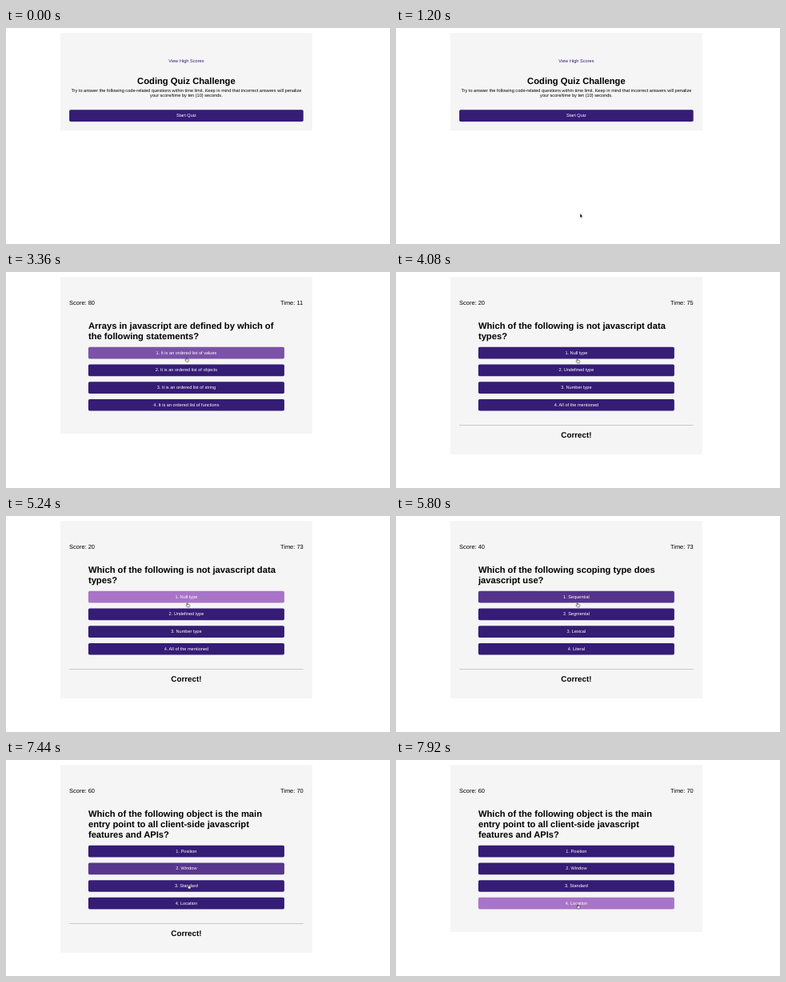
An HTML page that plays this animation: 480x270 px, repeating every 8 s.

```html
<!DOCTYPE html>
<html lang="en">
<head>
<meta charset="utf-8">
<title>Coding Quiz Challenge</title>
<style>
  :root { --dark: #351c75; --light: #a874c8; --half: #6d469b; }
  html, body { margin: 0; width: 100%; height: 100%; overflow: hidden; background: #fff; }

  /* Page laid out at full size, shown at 35% */
  .page {
    position: absolute; left: 0; top: 0; width: 1371px; height: 771px;
    transform: scale(.35); transform-origin: 0 0;
    font: 16px/18.4px "Liberation Sans", Arial, sans-serif; color: #000;
    text-rendering: geometricPrecision; white-space: nowrap;
  }
  .page * { box-sizing: border-box; }
  .panel, .intro, .quiz, .question, .feedback { position: absolute; left: 194px; top: 0; width: 900px; }
  .panel { top: 18px; height: 348px; background: #f5f5f5; }
  .panel, .intro, .quiz, .question, .feedback, .strip { animation: 8s step-end infinite; }
  .quiz, .question, .feedback { visibility: hidden; }

  .intro { text-align: center; }
  .intro > * { position: absolute; left: 0; width: 100%; margin: 0; }
  .link { top: 110px; color: var(--dark); }
  h1 { top: 170px; font-size: 32px; line-height: 36.8px; }
  .intro p { top: 216px; }

  .btn {
    height: 42px; margin: 0 0 20px; line-height: 42px; text-align: center;
    color: #fff; background: var(--dark); border-radius: 5px;
    animation: 8s ease infinite;
  }
  .intro .btn { left: 32px; top: 292px; width: 836px; }

  .stat { position: absolute; top: 98px; height: 24px; font-size: 21.3px; line-height: 24px; display: flex; overflow: hidden; }
  .score { left: 32px; }
  .time { right: 32px; }
  .stat b { font-weight: normal; white-space: pre; }
  .strip span { display: block; height: 24px; }

  .question { left: 294px; top: 174.4px; width: 700px; }
  h2 { margin: 0 0 20px; font-size: 32px; line-height: 36.8px; }

  .feedback { top: 546px; text-align: center; }
  .feedback i { display: block; height: 1px; margin: 0 32px 20px; background: #777; }
  .feedback strong { font-size: 28px; line-height: 32.2px; }

  /* Screens */
  .panel { animation-name: panel; }
  .intro { animation-name: intro; }
  .quiz { animation-name: quiz; }
  .q1 { animation-name: q1; }
  .q2 { animation-name: q2; }
  .q3 { animation-name: q3; }
  .q4 { animation-name: q4; }
  .feedback { animation-name: feedback; }
  @keyframes panel {
    0% { height: 348px } 32.9% { height: 559px } 50.9% { height: 633px }
    74.4% { height: 559px } 85.9% { height: 670px } 94.4%, 100% { height: 596px }
  }
  @keyframes intro { 0% { visibility: visible } 32.9%, 100% { visibility: hidden } }
  @keyframes quiz { 0% { visibility: hidden } 32.9%, 100% { visibility: visible } }
  @keyframes q1 { 0% { visibility: hidden } 32.9% { visibility: visible } 50.9%, 100% { visibility: hidden } }
  @keyframes q2 { 0% { visibility: hidden } 50.9% { visibility: visible } 71.9%, 100% { visibility: hidden } }
  @keyframes q3 { 0% { visibility: hidden } 71.9% { visibility: visible } 85.9%, 100% { visibility: hidden } }
  @keyframes q4 { 0% { visibility: hidden } 85.9%, 100% { visibility: visible } }
  @keyframes feedback {
    0% { visibility: hidden; top: 546px } 50.9% { visibility: visible; top: 546px }
    74.4% { visibility: hidden; top: 546px } 85.9% { visibility: visible; top: 582.8px }
    94.4%, 100% { visibility: hidden; top: 582.8px }
  }

  /* Counters */
  .score .strip { animation-name: score; }
  .time .strip { animation-name: time; }
  @keyframes score {
    0% { transform: translateY(0) } 43.9% { transform: translateY(-24px) }
    50.9% { transform: translateY(-48px) } 71.9% { transform: translateY(-72px) }
    85.9%, 100% { transform: translateY(-96px) }
  }
  @keyframes time {
    0% { transform: translateY(0) } 43.9% { transform: translateY(-24px) }
    56.9% { transform: translateY(-48px) } 65.3% { transform: translateY(-72px) }
    77.4% { transform: translateY(-96px) } 81.8% { transform: translateY(-120px) }
    92%, 100% { transform: translateY(-144px) }
  }

  /* Hover fades */
  .h-start { animation-name: h-start; }
  .h-1a { animation-name: h-1a; }
  .h-2a { animation-name: h-2a; }
  .h-3a { animation-name: h-3a; }
  .h-3b { animation-name: h-3b; }
  .h-3c { animation-name: h-3c; }
  .h-4b { animation-name: h-4b; }
  .h-4c { animation-name: h-4c; }
  .h-4d { animation-name: h-4d; }
  @keyframes h-start { 0%, 23.19% { background: var(--dark) } 26.94%, 100% { background: var(--light) } }
  @keyframes h-1a { 0%, 40.69% { background: var(--dark) } 44.44%, 100% { background: var(--light) } }
  @keyframes h-2a { 0%, 50.9% { background: var(--dark) } 54.2%, 100% { background: var(--light) } }
  @keyframes h-3a { 0%, 71.9% { background: var(--dark) } 75.2%, 78% { background: var(--light) } 81.75%, 100% { background: var(--dark) } }
  @keyframes h-3b { 0%, 78.8% { background: var(--dark) } 80% { background: var(--half) } 81.5%, 100% { background: var(--dark) } }
  @keyframes h-3c { 0%, 80.69% { background: var(--dark) } 84.44%, 100% { background: var(--light) } }
  @keyframes h-4b { 0%, 85.9% { background: var(--dark) } 89.65%, 91.46% { background: var(--light) } 95.2%, 100% { background: var(--dark) } }
  @keyframes h-4c { 0%, 92.95% { background: var(--dark) } 94.1% { background: var(--half) } 95.8%, 100% { background: var(--dark) } }
  @keyframes h-4d { 0%, 95.9% { background: var(--dark) } 99%, 100% { background: var(--light) } }

  /* Pointer: the origin is the tip */
  .pointer { position: absolute; left: 0; top: 0; visibility: hidden; animation: move 8s linear infinite; }
  .pointer svg { position: absolute; top: 0; overflow: visible; fill: #fff; stroke: #000; stroke-width: 1.5; stroke-linejoin: round; }
  .hand { left: -2.1px; animation: hand 8s step-end infinite; }
  .arrow { left: 0; animation: arrow 8s step-end infinite; }
  .arrow path { fill: #000; stroke: #fff; }
  @keyframes move {
    0%, 12.4% { visibility: hidden; transform: translate(231px, 248px) }
    12.5% { visibility: visible; transform: translate(231px, 248px); animation-timing-function: ease-in-out }
    22.5% { visibility: visible; transform: translate(223px, 124px); animation-timing-function: ease-out }
    24.5% { transform: translate(222.7px, 113px) }
    26.5%, 40.4% { transform: translate(223px, 111px); animation-timing-function: ease-out }
    42% { transform: translate(225.3px, 106.3px) }
    45%, 65% { transform: translate(226.5px, 108px) }
    77.5% { transform: translate(226.5px, 108px); animation-timing-function: ease-in-out }
    82% { transform: translate(228px, 140.5px) }
    83.5%, 91% { transform: translate(228px, 141px) }
    93% { transform: translate(228px, 155px) }
    96% { transform: translate(227px, 174px); animation-timing-function: ease-out }
    99%, 100% { visibility: visible; transform: translate(227px, 180px) }
  }
  @keyframes hand { 0% { opacity: 0 } 23.1% { opacity: 1 } 32.9% { opacity: 0 } 40.7%, 100% { opacity: 1 } }
  @keyframes arrow { 0% { opacity: 1 } 23.1% { opacity: 0 } 32.9% { opacity: 1 } 40.7%, 100% { opacity: 0 } }
</style>
</head>
<body>
<div class="page">
  <div class="panel"></div>

  <div class="intro">
    <div class="link">View High Scores</div>
    <h1>Coding Quiz Challenge</h1>
    <p>Try to answer the following code-related questions within time limit. Keep in mind that incorrect answers will penalize<br>your score/time by ten (10) seconds.</p>
    <div class="btn h-start">Start Quiz</div>
  </div>

  <div class="quiz">
    <div class="stat score"><b>Score: </b><div class="strip"><span>80</span><span>0</span><span>20</span><span>40</span><span>60</span></div></div>
    <div class="stat time"><b>Time: </b><div class="strip"><span>11</span><span>75</span><span>74</span><span>73</span><span>72</span><span>71</span><span>70</span></div></div>
  </div>

  <div class="question q1">
    <h2>Arrays in javascript are defined by which of<br>the following statements?</h2>
    <div class="btn h-1a">1. It is an ordered list of values</div>
    <div class="btn">2. It is an ordered list of objects</div>
    <div class="btn">3. It is an ordered list of string</div>
    <div class="btn">4. It is an ordered list of functions</div>
  </div>
  <div class="question q2">
    <h2>Which of the following is not javascript data<br>types?</h2>
    <div class="btn h-2a">1. Null type</div>
    <div class="btn">2. Undefined type</div>
    <div class="btn">3. Number type</div>
    <div class="btn">4. All of the mentioned</div>
  </div>
  <div class="question q3">
    <h2>Which of the following scoping type does<br>javascript use?</h2>
    <div class="btn h-3a">1. Sequential</div>
    <div class="btn h-3b">2. Segmental</div>
    <div class="btn h-3c">3. Lexical</div>
    <div class="btn">4. Literal</div>
  </div>
  <div class="question q4">
    <h2>Which of the following object is the main<br>entry point to all client-side javascript<br>features and APIs?</h2>
    <div class="btn">1. Position</div>
    <div class="btn h-4b">2. Window</div>
    <div class="btn h-4c">3. Standard</div>
    <div class="btn h-4d">4. Location</div>
  </div>

  <div class="feedback"><i></i><strong>Correct!</strong></div>
</div>

<div class="pointer">
  <svg class="arrow" width="4.2" height="6.3" viewBox="0 0 12 18"><path d="M0 0V15L3.5 12L6 17.5L8.5 16.5L6 11H11Z"/></svg>
  <svg class="hand" width="5.6" height="6.3" viewBox="0 0 16 18"><path d="M5 10V2Q6 0 7.2 2V7Q8.5 5.6 9.6 7.2Q11 6.2 12 7.8Q14 7 14.5 9V12Q14 15 12.5 17H6.5Q5 14.5 1.5 10.5Q2 8.5 5 11Z"/></svg>
</div>
</body>
</html>
```
